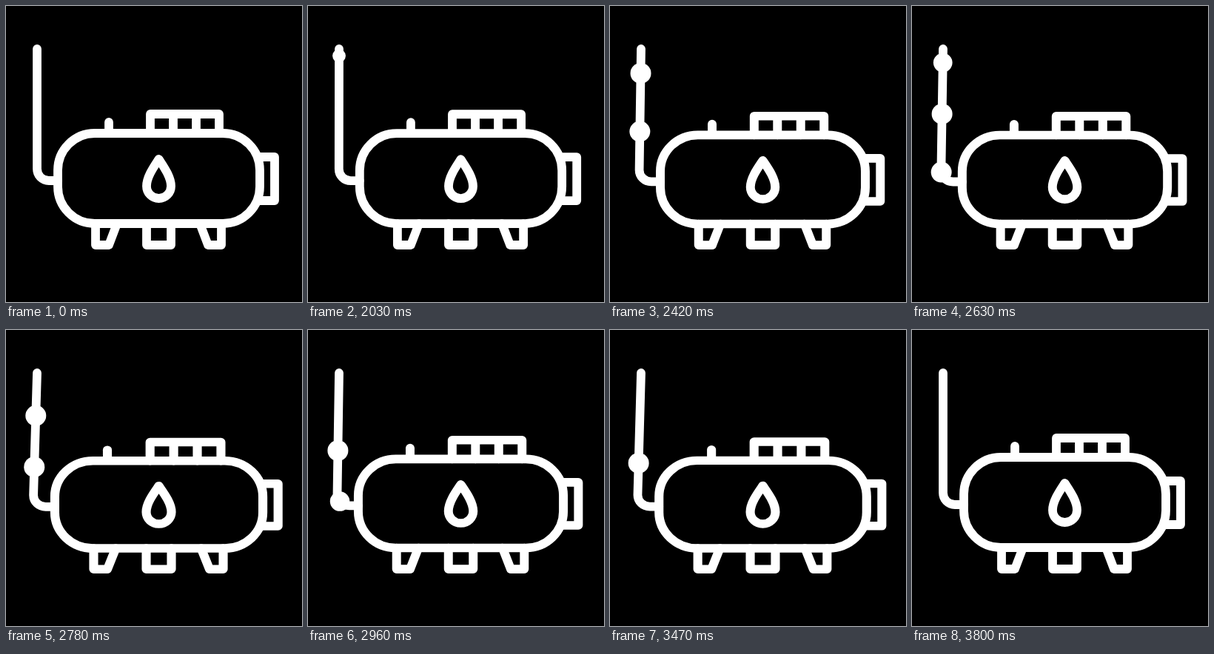
An HTML page for the animation above (3830 ms loop, 400 by 400 pixels).

```html
<!DOCTYPE html>
<html lang="en">
<head>
<meta charset="utf-8">
<title>Gas tank</title>
<style>
  html, body { margin: 0; width: 100%; height: 100%; overflow: hidden; background: #000; }
  svg { display: block; width: 100%; height: 100%; }
  .line { fill: none; stroke: #fff; stroke-width: 11.8; stroke-linecap: round; stroke-linejoin: round; }
</style>
</head>
<body>
<svg viewBox="0 0 400 400">
  <path id="pipe" class="line"/>
  <g id="tank" class="line">
    <rect x="70" y="172" width="273" height="122" rx="50"/>
    <path d="M139 157V170"/>
    <path d="M195 172V146H288V172M226 146V172M257 146V172"/>
    <path d="M343 204H363V263H343"/>
    <path d="M121 294V323H139L150 294"/>
    <path d="M190 294V323H223V294"/>
    <path d="M262 294L273 323H291V294"/>
    <path d="M206.5 207C200 217 190 231 190 243.5A16.5 16.5 0 0 0 223 243.5C223 231 213 217 206.5 207Z"/>
  </g>
  <g id="drops" fill="#fff"></g>
</svg>
<script>
  const LOOP = 3830, REST = 2000, STEP = 30;
  const BIRTHS = [0, 300, 565, 1010];
  const SPEED = 0.262;
  // time after the rest, amount of squash
  const SQUASH = [[0, 0], [225, 0.03], [525, 0.009], [795, 0.03], [1065, 0.008], [1400, 0.03], [1800, 0]];
  const CX = 206, FLOOR = 329;

  const pipe = document.getElementById('pipe');
  const tank = document.getElementById('tank');
  const drops = BIRTHS.map(() => {
    const c = document.createElementNS('http://www.w3.org/2000/svg', 'circle');
    return document.getElementById('drops').appendChild(c);
  });
  const clamp = v => Math.max(0, Math.min(1, v));

  function squashAt(t) {
    for (let i = 1; i < SQUASH.length; i++) {
      const [t0, a] = SQUASH[i - 1], [t1, b] = SQUASH[i];
      if (t <= t1) return a + (b - a) * (1 - Math.cos(Math.PI * (t - t0) / (t1 - t0))) / 2;
    }
    return 0;
  }

  function draw(ms) {
    const t = ms < REST + STEP ? 0 : Math.floor((ms - REST) / STEP + 1e-6) * STEP;
    const s = squashAt(t), sx = 1 + s, sy = 1 - s;
    const at = (x, y) => `${CX + (x - CX) * sx} ${FLOOR + (y - FLOOR) * sy}`;

    tank.setAttribute('transform',
      `translate(${CX} ${FLOOR}) scale(${sx} ${sy}) translate(${-CX} ${-FLOOR})`);
    // the top of the pipe stays put, the rest follows the tank
    pipe.setAttribute('d',
      `M42 58L${at(42, 220)}C${at(42, 229)} ${at(49, 236)} ${at(58, 236)}L${at(70, 236)}`);

    drops.forEach((c, i) => {
      const age = t - BIRTHS[i], dist = 1.5 + age * SPEED;
      const on = t > 0 && age >= 0 && dist < 200;
      c.setAttribute('visibility', on ? 'visible' : 'hidden');
      if (!on) return;
      const p = pipe.getPointAtLength(dist);
      const grow = clamp(age / 75), shrink = clamp((200 - dist) / 28);
      c.setAttribute('cx', p.x);
      c.setAttribute('cy', p.y);
      c.setAttribute('r', 5.5 + 8.5 * Math.min(grow, shrink));
    });
  }

  const start = performance.now();
  function tick() {
    draw((performance.now() - start) % LOOP);
    requestAnimationFrame(tick);
  }
  tick();
</script>
</body>
</html>
```
